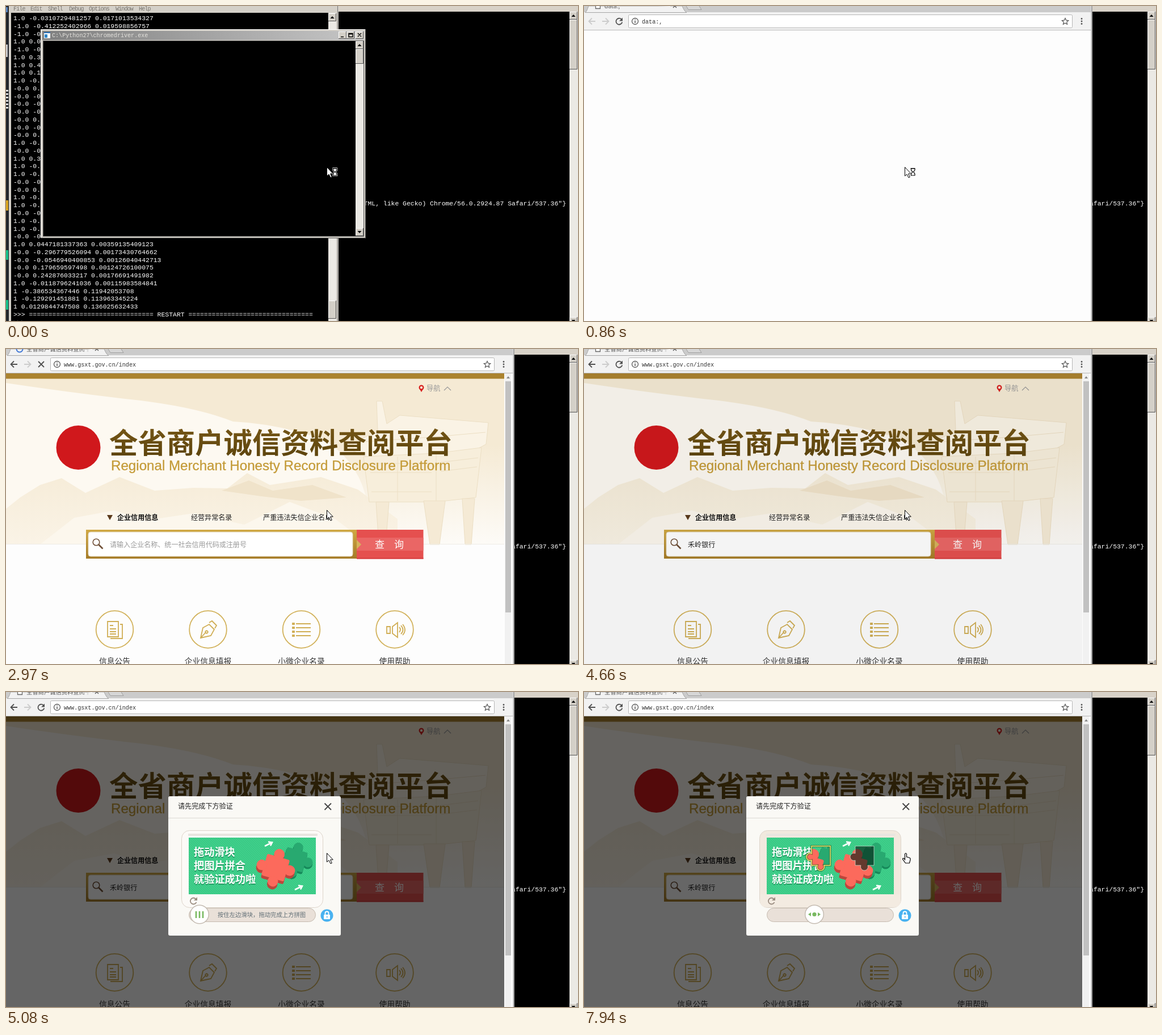
These frames come from a looping animation (1008x556 px, 8 s). An HTML page:

```html
<!DOCTYPE html>
<html lang="zh">
<head>
<meta charset="utf-8">
<title>Browser automation</title>
<style>
html, body { margin: 0; width: 100%; height: 100%; overflow: hidden; background: #000; }
svg { display: block; }
text { font-family: "Noto Sans CJK SC", "Noto Sans CJK", "Noto Sans", sans-serif; white-space: pre; }
.mono { font: 11.43px "Liberation Mono", "DejaVu Sans Mono", monospace; fill: #fff; }
.small { font: 10.08px "Liberation Mono", "DejaVu Sans Mono", monospace; fill: #333; }
.menu { font-size: 10px; letter-spacing: -.87px; fill: #77746e; }
.line { fill: none; stroke-width: 1.8; }
</style>
</head>
<body>
<script>
const LOOP = 8000;

const rows = `1.0 -0.0310729481257 0.0171013534327
-1.0 -0.412252402966 0.019598856757
-1.0 -0|1.0 0.0|-1.0 -0|1.0 0.3|1.0 0.4|1.0 0.1|1.0 -0.|-0.0 0.|-0.0 -0|-0.0 -0|-0.0 -0|-0.0 0.|-0.0 -0|-0.0 0.
1.0 -0.|-0.0 -0|1.0 0.3|1.0 -0.|1.0 -0.|-0.0 -0|-0.0 0.|1.0 -0.|1.0 -0.|-0.0 -0|1.0 -0.|1.0 -0.|-0.0 -0
1.0 0.0447181337363 0.00359135409123
-0.0 -0.296779526094 0.00173430764662
-0.0 -0.0546940400853 0.00126040442713
-0.0 0.179659597498 0.00124726100075
-0.0 0.242876033217 0.00176691491982
1.0 -0.0118796241036 0.00115983584841
1 -0.386534367446 0.11942053708
1 -0.129291451881 0.113963345224
1 0.0129844747508 0.136025632433
>>> ${'='.repeat(32)} RESTART ${'='.repeat(32)}
>>> `.split(/[|\n]/);

const logRows = [
  'Starting ChromeDriver 2.27.440174 (e97a722caafc2d3a8b807ee115bfb307f7d2cfd9) on ',
  'port 50170', 'Only local connections are allowed.', '', '_'];

const rect = (x, y, w, h, fill, more = '') =>
  `<rect x="${x}" y="${y}" width="${w}" height="${h}" fill="${fill}" ${more}/>`;
const path = (d, more = '') => `<path d="${d}" ${more}/>`;
const text = (x, y, s, more = '') => `<text x="${x}" y="${y}" ${more}>${s}</text>`;
const label = (x, y, s, size, fill, more = '') => text(x, y, s, `font-size="${size}" fill="${fill}" ${more}`);
const circle = (x, y, r, more) => `<circle cx="${x}" cy="${y}" r="${r}" ${more}/>`;
const line = (d, color, more = '') => path(d, `class="line" stroke="${color}" ${more}`);
const lines = (list, x, y, step) => list.map((s, i) => text(x, y + i * step, s, 'class="mono"')).join('');
const gradient = (id, from, to, more = 'x2="0" y2="1"', start = 0) =>
  `<linearGradient id="${id}" ${more}><stop offset="${start}" stop-color="${from}"/><stop offset="1" stop-color="${to}"/></linearGradient>`;

// Classic raised control
const raised = (x, y, w, h) => rect(x, y, w, h, '#d4d0c8') +
  path(`M${x + .5} ${y + h}V${y + .5}H${x + w}`, 'fill="none" stroke="#fff"') +
  path(`M${x} ${y + h - .5}H${x + w - .5}V${y}`, 'fill="none" stroke="#555"');
const arrow = (x, y, dir) => raised(x, y, 14, 14) + path(`M${x + 3.5} ${y + 7 + 2 * dir}h7l-3.5 ${-4 * dir}z`);

const terminal = () =>
  rect(0, 0, 5, 556, '#22262b') + rect(0, 2, 3, 9, '#5a86c0') + rect(0, 68, 3, 22, '#c9c9c9') +
  [148, 154, 160, 166, 172, 178].map(y => rect(0, y, 4, 3, '#ddd')).join('') +
  rect(0, 343, 4, 18, '#d9a520') + rect(0, 431, 4, 17, '#19c08a') + rect(0, 519, 4, 17, '#19c08a') +
  rect(5, 0, 581, 556, '#d4d0c8') + rect(9, 12, 559, 544, '#000') + rect(568, 12, 14, 544, '#ebe9e4') +
  arrow(568, 13, 1) + raised(568, 520, 14, 32) + rect(584, 0, 1, 556, '#777') +
  [[13, 'File'], [43, 'Edit'], [74, 'Shell'], [111, 'Debug'], [146, 'Options'], [193, 'Window'], [234, 'Help']]
    .map(([x, s]) => text(x, 8, s, 'class="mono menu"')).join('') +
  lines(rows, 13, 25, 13.76) +
  rect(586, 0, 422, 10, '#d8d2c8') + rect(993, 10, 15, 546, '#ebe9e4') + arrow(993, 10, 1) +
  raised(993, 24, 14, 88) + arrow(993, 549, -1) +
  text(987, 352, '(KHTML, like Gecko) Chrome/56.0.2924.87 Safari/537.36"}', 'class="mono" text-anchor="end"');

const driver = () =>
  raised(61, 41, 573, 369) + rect(64, 44, 567, 16, 'url(#bar)') +
  rect(67, 46, 11, 11, '#fff') + rect(67, 46, 11, 2, '#2a6fb5') + rect(68, 50, 5, 6, '#2f86c9') +
  text(81, 55, 'C:\\Python27\\chromedriver.exe', 'class="small" style="fill:#e4e2dd"') +
  [586, 600, 616].map(x => raised(x, 45, 14, 13)).join('') +
  line('M590 54.5h5M604 48.5h7v6h-7zM604 49.5h7M620 48l6 6m0-6l-6 6', '#000', 'style="stroke-width:1.4"') +
  rect(65, 61, 566, 346, '#555') + rect(66, 62, 550, 344, '#000') + rect(616, 62, 14, 344, '#ebe9e4') +
  arrow(616, 62, 1) + raised(616, 76, 14, 26) + arrow(616, 392, -1) +
  `<g id="log">${lines(logRows, 66, 73, 13.76)}</g>`;

const browser = () =>
  rect(0, 0, 893, 556, '#fdfdfd') + rect(893, 0, 3, 556, '#a5a5a5') + rect(893, 0, 1, 556, '#d8d8d8') +
  rect(0, 0, 893, 11, '#cbcbcb') + rect(0, 11, 893, 31, '#f2f2f2') + rect(0, 42, 893, 1, '#b8b8b8') +
  path('M2 11.5Q5 10 8 0H173Q177 10 181 11.5Z', 'fill="#f2f2f2" stroke="#a5a5a5"') +
  path('M180 0l4 6.5h23l-4-6.5', 'fill="#d6d6d6" stroke="#a0a0a0"') +
  path('M157 -3l6 6m0-6l-6 6', 'stroke="#555" stroke-width="1.3"') +
  `<g id="sheet">${path('M20.5 -6V4.5H28.5V-6', 'fill="#fff" stroke="#666" stroke-width="1.3"')}</g>
   <g id="spin">${line('M24 -5.5A5.5 5.5 0 1 1 18.5 0', '#4379d6', 'style="stroke-width:2"')}</g>` +
  text(36, 3.5, '', 'id="tab" font-size="10.3" fill="#555"') + rect(130, 0, 22, 10, 'url(#fade)') +
  rect(78.5, 15.5, 782, 23, '#fff', 'rx="2" stroke="#b5b5b5"') +
  `<g id="back">${line('M20 27H9M14 21.5L8.5 27l5.5 5.5', 'currentColor')}</g>` +
  line('M32 27h11M38 21.5l5.5 5.5l-5.5 5.5', '#ccc') +
  `<g id="reload">${line('M66 23.5A5.5 5.5 0 1 0 67.3 28.5', '#505050') + path('M68 20.5v6h-6z', 'fill="#505050"')}</g>
   <g id="stop">${line('M57 22l10 10m0-10l-10 10', '#505050')}</g>` +
  circle(90, 27, 5.5, 'fill="none" stroke="#555" stroke-width="1.3"') +
  path('M90 26v4M90 23.5v1.3', 'stroke="#555" stroke-width="1.5"') +
  text(102, 31, '', 'id="url" class="small"') +
  path('M848 21.5l1.7 3.7 4 .4-3 2.7.9 4-3.6-2.1-3.6 2.1.9-4-3-2.7 4-.4z', 'fill="none" stroke="#555" stroke-width="1.2"') +
  [22.5, 27, 31.5].map(y => circle(877, y, 1.4, 'fill="#555"')).join('');

const hero = () =>
  rect(0, 52, 878, 293, '#fdf9f1') +
  path('M0 52H878V345H640Q650 215 560 160Q480 132 400 128Q330 100 210 88Q100 75 0 60Z', 'fill="url(#sky)"') +
  path('M0 345V282L25 262 60 240 98 228 140 254 200 226 262 250 330 245 390 246 425 219 465 240 555 226 620 248 690 300V345Z', 'fill="url(#hill)"') +
  path('M60 345L120 298 190 285 250 302 330 290 420 310 500 270 580 300 640 345Z', 'fill="#fcf7ed"') +
  path('M380 250L428 232 470 250 540 240 600 262 520 268 450 260Z', 'fill="#f0e3ca"') +
  `<g fill="#faf3e5" stroke="#ecdfc4">
    <path d="M612 165L655 145 653 92H663L671 132 694 117 850 130 846 168 824 180 640 192 612 180Z"/>
    <path d="M630 190L758 184 838 174 828 262 758 270 640 270Z" fill="#f7eedb"/>
    <path d="M652 270h23l-6 75h-12zM736 268h38l-10 77h-17zM804 264h22l-6 81h-11z" fill="#f5ead5"/>
    <path d="M640 202h112M642 218h108M644 252h106M690 190v78M758 184v84M766 200l66-8M766 216l64-8M612 165l145-10 88-8" fill="none"/>
  </g>` +
  rect(0, 344, 878, 1, '#efece6');

const badge = (x, name, icon) => circle(x, 495, 32.8, 'class="line" stroke="#d2b25b"') +
  line(icon, '#d0ae55') + label(x, 556, name, 13.75, '#333', 'text-anchor="middle"');

const page = () =>
  rect(0, 43, 879, 513, '#fdfdfd') + hero() + rect(0, 43, 878, 9.5, '#ab832f') +
  rect(879, 43, 11, 513, '#f1f1f1') + rect(880, 57, 10, 408, '#c1c1c1') + path('M882 52l3-4 3 4z', 'fill="#888"') +
  circle(732, 68, 3.4, 'fill="none" stroke="#d8201f" stroke-width="2.2"') + path('M729 71l3 5 3-5z', 'fill="#d8201f"') +
  label(741, 74, '导航', 12.3, '#999') + line('M772 73l6-6 6 6', '#999', 'style="stroke-width:1.2"') +
  circle(127.5, 174, 39, 'fill="#d0181c"') +
  label(182, 183.5, '全省商户诚信资料查阅平台', 50.4, 'url(#brown)', 'font-weight="900"') +
  label(185, 214, 'Regional Merchant Honesty Record Disclosure Platform', 24.15, '#c49b38',
    'style="font-family:\'Liberation Sans\',sans-serif" stroke="#c49b38" stroke-width=".3"') +
  path('M178 293h10l-5 9z', 'fill="#5b3a1c"') +
  label(196, 301.5, '企业信用信息', 12.05, '#111', 'font-weight="700"') +
  label(326, 301.5, '经营异常名录', 12.05, '#222') + label(453, 301.5, '严重违法失信企业名单', 12.15, '#222') +
  rect(141, 319, 477, 51, 'url(#gold)') + rect(145, 323, 466, 43, '#fff', 'rx="4" stroke="#e2d6b8"') +
  circle(159, 341, 5.8, 'fill="none" stroke="#705038" stroke-width="1.6"') +
  path('M163.5 345.5l7 7', 'stroke="#705038" stroke-width="2.6"') +
  text(183, 350, '', 'id="query" font-size="12.05"') + rect(231, 339, 1, 14, '#222', 'id="caret"') +
  rect(618, 319, 117.5, 51.5, '#e5504f') + rect(618, 333, 117.5, 23, '#ea6665') + rect(618, 368.5, 117.5, 2, '#d83e40') +
  path('M618 337l8 8-8 8z', 'fill="#d6b25c"') +
  label(650, 351, '查', 17, '#fff') + label(684, 351, '询', 17, '#fff') +
  badge(191.5, '信息公告', 'M179 481h19v27h-19zM201 486h4v25h-21M183 488h6M183 494h11M183 499h11M183 503h11') +
  badge(356, '企业信息填报', 'M343 510l4-18 11-6 9 9-6 11zM343 510l9-10M352 498a2 2 0 1 0 3 3a2 2 0 1 0-3-3M358 483l5-3 8 8-3 5') +
  badge(520.5, '小微企业名录', [485, 492, 499, 506].map(y => `M505 ${y - 1}h3v2h-3zM511 ${y}h26`).join('')) +
  badge(685, '使用帮助', 'M671 490h6v12h-6zM681 490l9-7v26l-9-7zM693 491q4 4 0 9M696 488q7 8 0 15M699 486q8 10 0 19') +
  rect(0, 43, 878, 513, '#000', 'id="shade"');

const jigsaw = (x, y, s, fill) => `<g transform="translate(${x} ${y}) rotate(16) scale(${s})" fill="${fill}">
  <rect x="-21" y="-20" width="42" height="40" rx="3"/>${[[0, -25], [-25, 2], [26, -2], [2, 25]]
  .map(([a, b]) => circle(a, b, 9.5, '')).join('')}</g>`;
const pointer = d => path(d, 'fill="none" stroke="#fff" stroke-width="2.6"');

const slogan = (dy, fill) => ['拖动滑块', '把图片拼合', '就验证成功啦']
  .map((s, i) => label(331, 289 + 24 * i + dy, s, 18.2, fill, 'font-weight="900"')).join('');

const picture = () => `<g id="picture">` +
  rect(322, 257, 224, 100, '#3fcf8b') + rect(322, 257, 224, 100, 'url(#stripes)') +
  jigsaw(508, 299, .92, '#16895a') + jigsaw(509, 296, .9, '#28a970') +
  jigsaw(474, 315, .98, '#bd463c') + jigsaw(475, 310, .98, '#fc6a5c') +
  slogan(1.5, '#249a63') + slogan(0, '#fff') +
  pointer('M456 272l12-6M462 264.5l7 1-3 6') + pointer('M509 349l12-6M515 341.5l7 1-3 6') + `</g>`;

const gap = 'M478 272H511V306H500a6.5 6.5 0 1 1-12 0H478V297a6.5 6.5 0 1 1 0-12Z';

const dialog = () =>
  rect(286, 184, 304, 246, '#faf9f5', 'rx="3"') + rect(286, 222, 304, 1, '#dcd9d4') +
  label(303, 206, '请先完成下方验证', 12.1, '#222') + line('M561.5 196.5l11.5 11.5m0-11.5l-11.5 11.5', '#444') +
  rect(309.5, 244.5, 249, 136, '#fcfaf7', 'id="case" rx="14" stroke="#ddd4ca"') +
  path('M310 357H558V367Q558 380 545 380H323Q310 380 310 367Z', 'id="tray" fill="#f3ebe1"') +
  rect(321, 250, 228, 4, '#e9e5e0') + picture() +
  `<g id="puzzle">${path(gap, 'fill="#001a10" fill-opacity=".6" stroke="#d5e6d8" stroke-opacity=".7"')}
    <g id="slice"><g clip-path="url(#cut)"><use href="#picture"/></g>
    ${path(gap, 'fill="none" stroke="#294a1c" stroke-width="3.5" stroke-opacity=".6"')}
    ${path(gap, 'fill="none" stroke="#efe56a" stroke-width="1.5"')}</g></g>` +
  line('M335 366a5.5 5.5 0 1 0 .5 5', '#9a8c80') + path('M337 362v6h-6z', 'fill="#9a8c80"') +
  rect(322.5, 381.5, 223, 24, '#e9e0d8', 'rx="12" stroke="#c6bbb0"') +
  label(373, 397, '按住左边滑块，拖动完成上方拼图', 10.35, '#5f6d74', 'id="tip"') +
  `<g id="knob">${circle(0, 392.5, 16.3, 'fill="#fff" stroke="#c5bcb2" stroke-width="1.5"')}
    <g id="bars">${[-6, 0, 6].map(x => rect(x - 1.3, 387, 2.6, 12, '#79b961')).join('')}</g>
    <g id="grip" fill="#79b961">${circle(0, 392.5, 3.6, '')}<path d="M-11 392.5l5-3.5v7zM11 392.5l-5-3.5v7z"/></g></g>` +
  circle(565.5, 394.5, 11, 'fill="#49b2f0"') + rect(560, 393, 11, 8, '#fff', 'rx="1"') +
  line('M562.5 393v-2.5a3 3 0 0 1 6 0v2.5', '#fff') + rect(565, 395.5, 1.4, 3, '#49b2f0');

const glass = 'M575.5 286.5h8M575.5 299h8M576.5 287v2.5l2.5 3.3-2.5 3.5V299h6.5v-2.7l-2.5-3.5 2.5-3.3V287z';

document.body.innerHTML = `<svg width="1008" height="556" viewBox="0 0 1008 556">
<defs>
  ${gradient('bar', '#7f7f7f', '#c6c6c6', '')}
  ${gradient('brown', '#7a5a18', '#5a420c')}
  ${gradient('gold', '#d0a843', '#a57b27')}
  ${gradient('sky', '#f5ead4', '#fdfbf7', 'x2="0" y2="1"', .4)}
  ${gradient('hill', '#f6ecd8', '#faf3e6')}
  <linearGradient id="fade"><stop stop-color="#f2f2f2" stop-opacity="0"/><stop offset="1" stop-color="#f2f2f2"/></linearGradient>
  <pattern id="stripes" width="4" height="4" patternUnits="userSpaceOnUse"><path d="M-1 -1l6 6M-1 3l2 2M3 -1l2 2" stroke="#36c47f"/></pattern>
  <clipPath id="cut"><path d="${gap}"/></clipPath>
</defs>
${terminal()}${driver()}
<g id="browser">${browser()}<g id="page">${page()}</g><g id="dialog">${dialog()}</g></g>
<g id="mouse">${path('M565.5 284.5V300l3.5-3 3 6 2.3-1-2.7-6h4.7Z', 'fill="#fff" stroke="#000"')}</g>
<g id="hand">${path('M565.5 286q1.5-3 3 0v5l5 1.5q2 .5 1.5 4l-1.5 5.5h-7l-5-7q0-2.5 2.5-1l1.5 2z', 'fill="#fff" stroke="#000" stroke-width="1.2"')}</g>
<g id="wait">${path(glass, 'fill="#fff" stroke="#fff" stroke-width="2.6"') + path(glass, 'fill="none" stroke="#000" stroke-width="1.2"')}</g>
</svg>`;

const $ = id => document.getElementById(id);
const alpha = (id, a) => $(id).setAttribute('opacity', +a);
const move = (id, x) => $(id).setAttribute('transform', `translate(${x} 0)`);
// Value of the last [time, value] pair already reached
const held = (t, pairs) => pairs.reduce((v, [at, next]) => t >= at ? next : v, 0);

function draw(t) {
  const within = (a, b) => t >= a && t < b;
  const loading = within(1850, 3330), typed = t >= 3210, hover = t >= 6660;

  alpha('log', t >= 430);
  alpha('browser', t >= 860);
  alpha('page', t >= 2850);
  alpha('wait', t < 1260 || within(1850, 2130) || within(2250, 2550));
  alpha('mouse', !hover);
  alpha('hand', hover);

  alpha('spin', loading);
  alpha('sheet', !loading);
  alpha('stop', loading);
  alpha('reload', !loading);
  const turn = Math.floor((t - 1850) / 140) * 50;
  $('spin').setAttribute('transform', `rotate(${t < 2850 ? -turn : turn} 24 0)`);
  $('back').style.color = t < 2400 ? '#ccc' : '#505050';
  $('url').textContent = t < 2400 ? 'data:,' : 'www.gsxt.gov.cn/index';
  $('tab').textContent = t < 2400 ? 'data:,' : t < 2850 ? 'www.gsxt.gov.cn' : '全省商户诚信资料查阅平';

  $('query').textContent = typed ? '禾岭银行' : '请输入企业名称、统一社会信用代码或注册号';
  $('query').setAttribute('fill', typed ? '#222' : '#999');
  alpha('caret', within(3210, 4140));

  alpha('shade', held(t, [[4540, .015], [4660, .045], [4810, .4], [4930, .6]]));
  alpha('dialog', held(t, [[4810, .65], [4930, 1]]));

  const open = held(t, [[6930, .4], [7080, .8], [7230, 1]]);
  const x = held(t, [[0, 341], [6930, 367], [7380, 382], [7660, 398], [7940, 406]]);
  alpha('bars', !hover);
  alpha('grip', hover);
  alpha('tray', hover);
  $('case').setAttribute('fill', t < 6780 ? '#fcfaf7' : '#f1e9de');
  alpha('puzzle', open);
  alpha('tip', 1 - open);
  move('knob', x);
  move('slice', x - 483);
}

const start = performance.now();
function tick() {
  draw((performance.now() - start) % LOOP);
  requestAnimationFrame(tick);
}
tick();
</script>
</body>
</html>
```
